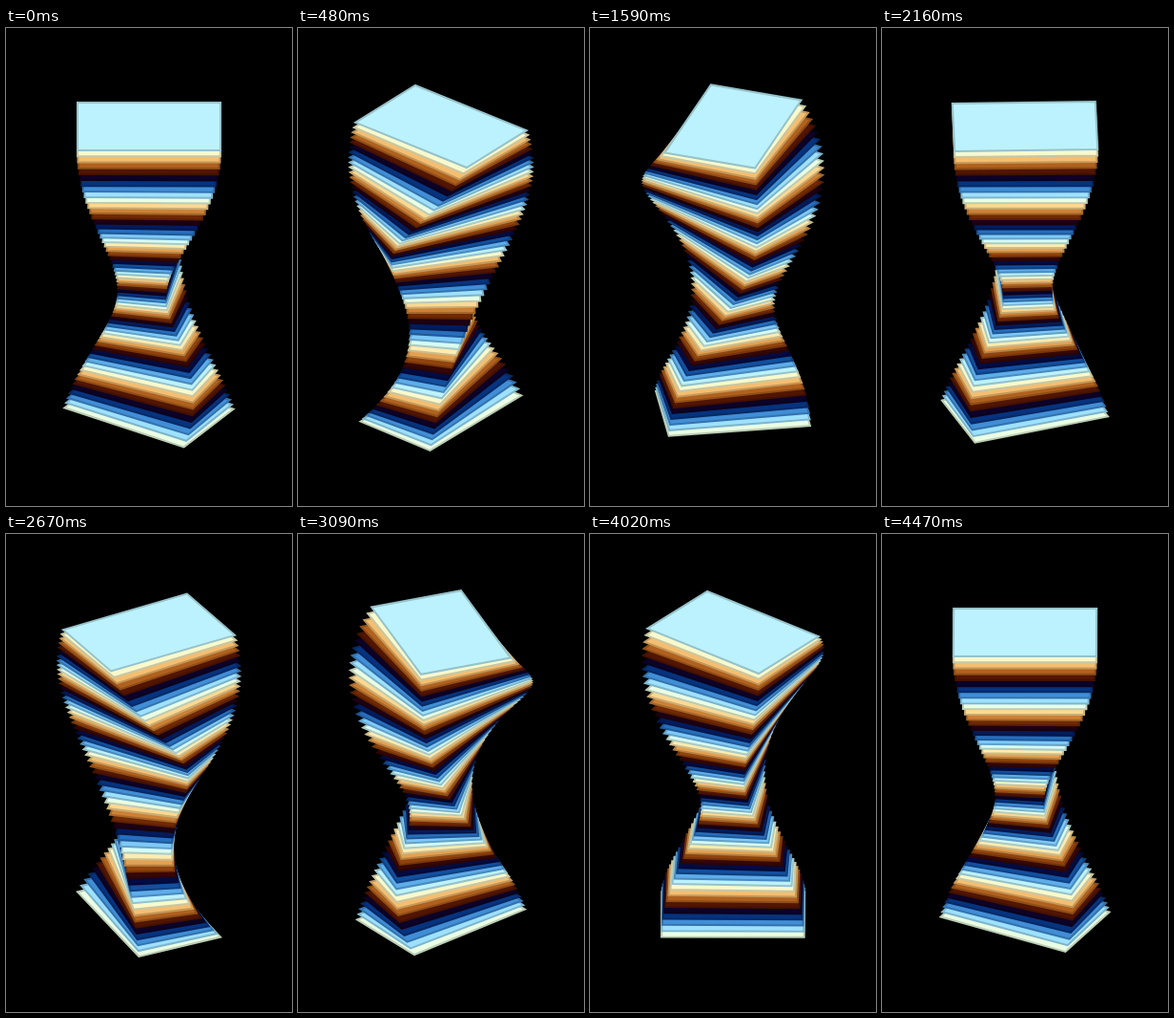
An HTML page with a canvas for the animation above (4.5 s loop, 300x500 px).

```html
<!DOCTYPE html>
<html lang="en">
<head>
<meta charset="utf-8">
<title>Twisting stack</title>
<style>
  html, body { margin: 0; width: 100%; height: 100%; overflow: hidden; background: #000; }
  canvas { display: block; width: 300px; height: 500px; }
</style>
</head>
<body>
<canvas id="stage" width="300" height="500"></canvas>
<script>
const ctx = document.getElementById('stage').getContext('2d');
const TAU = Math.PI * 2;
const LOOP = 4500;
const LAYERS = 60;
const TOP = 103;
const STEP = 5;

// Cosine palette: the three channels are shifted copies of one wave.
function palette(t, light = 1) {
  const wave = shift => Math.round(127.5 * light * (1 + Math.cos(TAU * (t + shift))));
  return `rgb(${wave(0)},${wave(0.1)},${wave(0.2)})`;
}

const layers = Array.from({ length: LAYERS }, (_, i) => {
  const p = i / LAYERS;
  const hue = 0.828 + 0.12 * i;
  return {
    y: TOP + i * STEP,
    w: 100 + 50 * Math.cos(TAU * p),
    h: 100 + 50 * Math.sin(TAU * p),
    lead: p / 10,
    fill: palette(hue),
    edge: palette(hue, 0.8)
  };
});

function drawLayer({ y, w, h, lead, fill, edge }, phase) {
  ctx.save();
  ctx.translate(150, y);
  ctx.scale(1, 0.5);
  ctx.rotate(Math.PI * (1 - Math.cos(TAU * (phase + lead))));
  ctx.beginPath();
  ctx.rect(-w / 2, -h / 2, w, h);
  ctx.restore();
  ctx.fillStyle = fill;
  ctx.fill();
  ctx.strokeStyle = edge;
  ctx.stroke();
}

function draw(now) {
  const phase = (now % LOOP) / LOOP;
  ctx.fillStyle = '#000';
  ctx.fillRect(0, 0, 300, 500);
  ctx.lineWidth = 2;
  for (let i = LAYERS - 1; i >= 0; i--) drawLayer(layers[i], phase);
}

let start;
function tick(now) {
  start ??= now;
  draw(now - start);
  requestAnimationFrame(tick);
}
draw(0);
requestAnimationFrame(tick);
</script>
</body>
</html>
```
